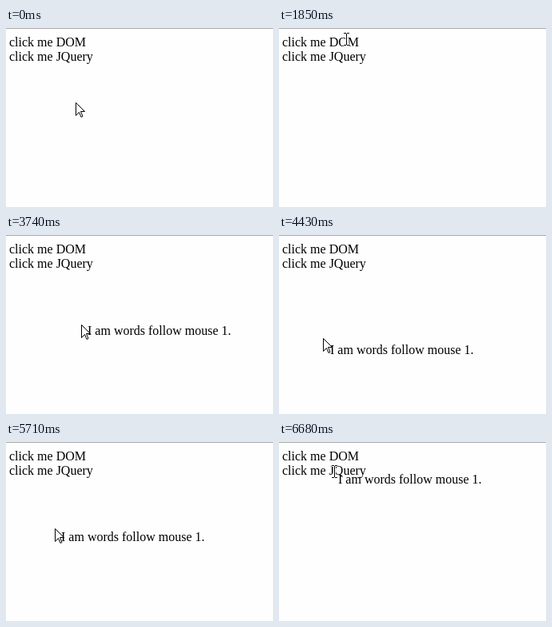
These frames come from a looping animation (334 by 224 pixels, 8000 ms). An HTML page:

```html
<!DOCTYPE html>
<html lang="en">
<head>
<meta charset="utf-8">
<title>Words follow the mouse</title>
<style>
html, body { margin: 0; width: 100%; height: 100%; overflow: hidden; background: #fefefe; }
svg { display: block; }
text { font: 16px "Liberation Serif", "Times New Roman", serif; }
</style>
</head>
<body>
<svg width="334" height="224" viewBox="0 0 334 224">
  <defs><path id="bar" fill="none" d="M0-6.5H3M4-6.5H7M3.5-6V8M0 8.5H3M4 8.5H7"/></defs>
  <rect width="334" height="1" fill="#a9a9a9"/>
  <text x="4" y="23">click me DOM</text>
  <text x="4" y="41">click me JQuery</text>
  <text id="words">I am words follow mouse 1.</text>
  <g id="pointer">
    <path id="arrow" fill="#fff" stroke="#000" d="M.5 .5V16.5L4.5 12.5 7 18.5 9 17.5 6.5 11.5H11.5Z"/>
    <g id="beam">
      <use href="#bar" stroke="#fefefe" stroke-width="3"/>
      <use href="#bar" stroke="#000"/>
    </g>
  </g>
</svg>
<script>
const LOOP = 8000, TICK = 138, CLICK = 19;
const [words, pointer, arrow, beam] =
  ['words', 'pointer', 'arrow', 'beam'].map(id => document.getElementById(id));

// Key points of the mouse path: tick, x, y
const path = [
  [0, 87, 93], [4, 200, 170], [6, 247, 110], [8, 167, 65],   // wander
  [13, 81, 13], [CLICK, 81, 13],                             // rest on the first line, click
  [21, 146, 70], [23, 47, 131], [24, 12, 122], [26, 94, 109],
  [27, 94, 112], [29, 146, 84], [31, 56, 133], [32, 55, 129],
  [36, 146, 100], [38, 80, 145], [40, 61, 108], [42, 61, 108],
  [47, 66, 36]                                               // rest on the second line
];

function mouseAt(tick) {
  const next = path.findIndex(key => key[0] > tick);
  if (next < 0) return path.at(-1).slice(1);
  const [t0, x0, y0] = path[Math.max(0, next - 1)], [t1, x1, y1] = path[next];
  const k = Math.max(0, (tick - t0) / (t1 - t0));
  return [Math.round(x0 + (x1 - x0) * k), Math.round(y0 + (y1 - y0) * k)];
}

const show = (el, on) => el.setAttribute('visibility', on ? 'visible' : 'hidden');
const move = (el, x, y) => el.setAttribute('transform', `translate(${x} ${y})`);

function draw(time) {
  const tick = Math.floor(time % LOOP / TICK);
  const [x, y] = mouseAt(tick);
  const overText = y > 9 && y < 45 && x < 108;
  move(pointer, x, y);
  show(arrow, !overText);
  show(beam, overText);

  // The words trail the mouse by one tick
  const [lastX, lastY] = mouseAt(tick - 1);
  move(words, lastX + 8, lastY + 16);
  show(words, tick >= CLICK);
}

const start = performance.now();
function run() {
  draw(performance.now() - start);
  requestAnimationFrame(run);
}
run();
</script>
</body>
</html>
```
